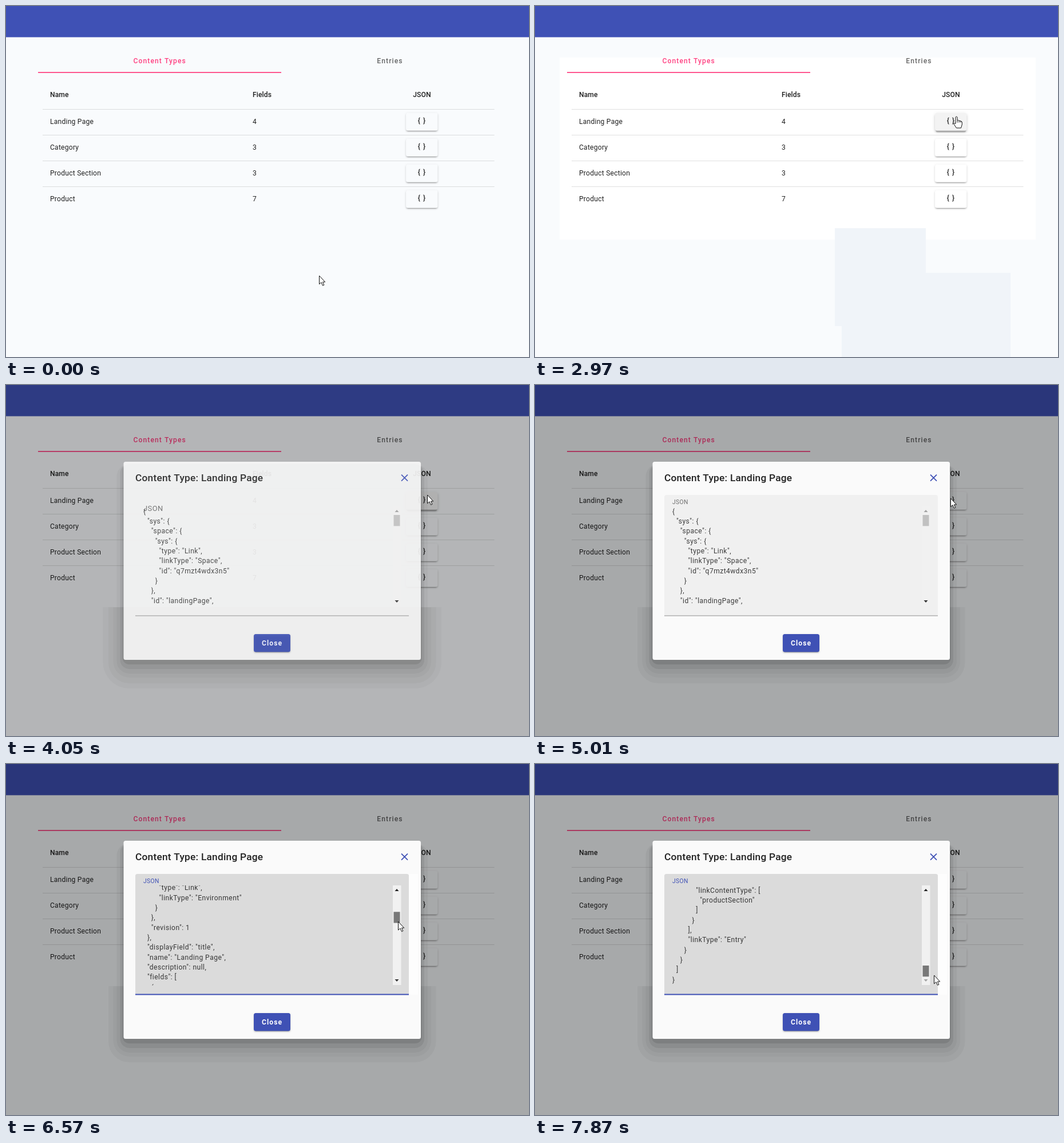
Animation, 914 px wide and 613 px high, one loop 7990 ms. Source, as an HTML page with a canvas:

```html
<!DOCTYPE html>
<html lang="en">
<head>
<meta charset="utf-8">
<title>Content types</title>
<style>
  html, body { margin: 0; width: 100%; height: 100%; overflow: hidden; background: #f9fbfd; }
  canvas { display: block; }
</style>
</head>
<body>
<canvas id="stage" width="914" height="613"></canvas>
<script>
const ctx = document.getElementById('stage').getContext('2d');
const LOOP = 7990, FONT = 12.14, LINE = 17.34;
const PAGE = '#f9fbfd', GHOST = '#f0f4f9', INDIGO = '#3f51b5', PINK = '#ff4081', INK = 'rgba(0,0,0,.87)';
const ROWS = [['Landing Page', 4], ['Category', 3], ['Product Section', 3], ['Product', 7]];

const field = (id, name, type) =>
  ({ id, name, type, localized: false, required: false, disabled: false, omitted: false });
const link = (linkType, id) => ({ type: 'Link', linkType, id });
const model = {
  sys: {
    space: { sys: link('Space', 'q7mzt4wdx3n5') },
    id: 'landingPage',
    type: 'ContentType',
    createdAt: '2020-04-02T09:14:27.310Z',
    updatedAt: '2020-04-02T09:14:27.310Z',
    environment: { sys: { id: 'master', type: 'Link', linkType: 'Environment' } },
    revision: 1
  },
  displayField: 'title',
  name: 'Landing Page',
  description: null,
  fields: [
    field('title', 'Title', 'Symbol'),
    field('slug', 'Slug', 'Symbol'),
    field('intro', 'Intro', 'Text'),
    {
      ...field('sections', 'Sections', 'Array'),
      items: {
        type: 'Link',
        validations: [{ linkContentType: ['productSection'] }],
        linkType: 'Entry'
      }
    }
  ]
};
const lines = JSON.stringify(model, null, 2).split('\n');
const MAX_SCROLL = (lines.length - 10) * LINE;

const arrow = new Path2D('M0 0V14.8L3.5 11.7 6 17.3 8.3 16.3 6 11H10.2Z');
const hand = new Path2D('M-1.5 10V1.2Q0-1.2 1.5 1.2V7Q4 5.4 4.6 7.6Q7 6.4 7.5 8.6' +
  'Q9.6 8 9.8 10V14L8 20H0L-4.6 13Q-4.4 10.4-1.5 12.5Z');

const roam = [[545, 476], [600, 520], [700, 570], [812, 612], [760, 590], [640, 550], [574, 524]];
const climb = [[556, 530], [545, 505], [600, 450], [665, 400], [700, 320], [725, 240], [736, 193]];

// Number of steps (0..n) done when the first falls on a and the last on b.
function steps(t, a, b, n) {
  return t < a ? 0 : Math.min(n, 1 + Math.floor((t - a + 1) * (n - 1) / (b - a)));
}
const mix = (a, b, k) => a + (b - a) * k;
const black = a => `rgba(0,0,0,${a})`;

function rect(x, y, w, h, color, r = 0) {
  ctx.fillStyle = color;
  ctx.beginPath();
  ctx.roundRect(x, y, w, h, r);
  ctx.fill();
}

function text(str, x, y, { size = FONT, weight = 400, gap = 0, color = INK, align = 'left' } = {}) {
  ctx.font = `${weight} ${size}px Roboto, sans-serif`;
  ctx.letterSpacing = gap + 'px';
  ctx.textAlign = align;
  ctx.fillStyle = color;
  ctx.fillText(str, x, y);
}

function shadow(x, y, w, h, dy, blur, spread, alpha) {
  ctx.save();
  ctx.shadowColor = black(alpha);
  ctx.shadowBlur = blur;
  ctx.shadowOffsetX = 2000;
  ctx.shadowOffsetY = dy;
  rect(x - 2000 - spread, y - spread, w + 2 * spread, h + 2 * spread, '#000', 3);
  ctx.restore();
}

function raised(x, y, w, h, color, lift = 1) {
  shadow(x, y, w, h, 2.4 * lift, 1, -1.5, .22);
  shadow(x, y, w, h, 1.7 * lift, 2 * lift, 0, .14);
  shadow(x, y, w, h, .9 * lift, 4 * lift, 0, .1);
  rect(x, y, w, h, color, 3.5);
}

function drawPage(t) {
  const open = t >= 3930;
  const card = open ? 0 : steps(t, 1490, 1910, 4) / 4;
  const hover = t >= 2970 && t < 4290;
  rect(0, 0, 914, 613, PAGE);
  if (!open) {
    rect(43, 90, 832, 318, `rgba(255,255,255,${card})`);
    if (t >= 890) rect(536, 466, 295, 147, GHOST);
    if (t >= 2580) rect(524, 388, 159, 171, GHOST);
  }
  rect(0, 0, 914, 54.5, INDIGO);

  const tab = { weight: 500, gap: 1.084, align: 'center' };
  text('Content Types', 268.7, 100, { ...tab, color: PINK });
  text('Entries', 671, 100, { ...tab, color: black(.6) });
  rect(56, 115.3, 425, 1.7, PINK);

  const head = { weight: 500, gap: .087 };
  text('Name', 77, 159, head);
  text('Fields', 431, 159, head);
  text('JSON', 727, 159, { ...head, align: 'center' });

  ROWS.forEach(([name, count], i) => {
    const y = 180 + Math.round(i * 45.07);
    rect(64, y, 789.5, 1, black(.12));
    text(name, 77, y + 26, { gap: .217 });
    text(count, 431, y + 26, { gap: .217 });
    const lit = hover && i === 0;
    raised(699, y + 6.8, 55.5, 31, lit ? '#f3f3f3' : card ? '#fff' : PAGE, lit ? 1.7 : 1);
    text('{ }', 727, y + 25, { weight: 500, gap: 1.084, align: 'center' });
  });
}

function drawBands(early) {
  const bands = [[26.5, 41, .035, 388], [18, 31, .03, 388], [12, 24, .04, 138],
    [6, 16, .07, 138], [2, 8, .1, 138]];
  if (early) bands.unshift([36, 50, .03, 388]);
  for (const [side, drop, alpha, top] of bands) {
    const r = 10 + side;
    rect(205.5 - side, top, 519.5 + 2 * side, 480 + drop - top, black(alpha),
      top > 300 ? [0, 0, r, r] : r);
  }
}

function triangle(x, y, dir, color) {
  ctx.fillStyle = color;
  ctx.beginPath();
  ctx.moveTo(x - 3.5, y + 2 * dir);
  ctx.lineTo(x + 3.5, y + 2 * dir);
  ctx.lineTo(x, y - 2 * dir);
  ctx.fill();
}

function drawField(t, phase, scroll, mouseX) {
  const focus = t >= 6120;
  const hover = t >= 5010 && mouseX < 704;
  const shade = (focus ? .125 : hover ? .06 : .04) * [0, 0, .5, 1][phase];
  if (hover) rect(704, 192, 16, 211, '#fdfdfd');
  rect(226, 192, 478, 211, black(shade), [3.5, 3.5, 0, 0]);
  if (focus) rect(226, 401.6, 478, 1.8, INDIGO);
  else rect(226, 402.5, 478, 1, hover ? black(.87) : black(.42));

  const k = [0, .2, .75, 1][phase];
  const size = mix(13.6, 10.4, k);
  text('JSON', 240, mix(223, 208, k), { size, gap: size * .03125, color: focus ? INDIGO : black(.55) });

  ctx.save();
  ctx.beginPath();
  ctx.rect(226, 212, 450, 174.5);
  ctx.clip();
  lines.forEach((line, i) => {
    const y = Math.round(224.5 + i * LINE - scroll);
    if (y > 200 && y < 402) text(line, 240, y, { gap: .433, color: black(.75) });
  });
  ctx.restore();

  const p = scroll / MAX_SCROLL;
  const thumbHot = t >= 5850;
  rect(676, 212, 14.5, 174, '#f1f1f1');
  rect(677.5, 227 + p * 125, 11, 19.3, focus ? '#787878' : thumbHot ? '#a8a8a8' : '#c1c1c1');
  triangle(683, 220, 1, p > 0 ? '#222' : '#a3a3a3');
  triangle(683, 378, -1, p < 1 ? '#333' : '#a3a3a3');
}

function drawDialog(t, scroll, mouseX) {
  const phase = steps(t, 3930, 4290, 4) - 1;
  if (phase < 0) return;
  rect(0, 0, 914, 613, black([.12, .28, .32, .33][phase]));
  ctx.save();
  ctx.globalAlpha = [.35, .9, 1, 1][phase];
  if (phase === 0) {
    ctx.translate(465, 307);
    ctx.scale(.88, .88);
    ctx.translate(-465, -307);
  }
  drawBands(phase < 2);
  rect(205.5, 134, 519.5, 346, '#fafafa', 3.5);
  text('Content Type: Landing Page', 226, 168, { size: 17.34, weight: 500, gap: .217 });

  ctx.strokeStyle = INDIGO;
  ctx.lineWidth = 1.8;
  ctx.beginPath();
  ctx.moveTo(691, 156.7);
  ctx.lineTo(702, 167.7);
  ctx.moveTo(702, 156.7);
  ctx.lineTo(691, 167.7);
  ctx.stroke();

  drawField(t, phase, scroll, mouseX);
  if (phase) raised(433, 435, 64, 31.2, INDIGO);
  else rect(433, 435, 64, 31.2, INDIGO, 3.5);
  text('Close', 465, 455, { weight: 700, gap: 1.084, color: '#fff', align: 'center' });
  ctx.restore();
}

// Share of the scrollbar's way travelled while dragging.
function dragged(t) {
  const n = steps(t, 6120, 7110, 8) + steps(t, 7230, 7870, 6);
  return n <= 4 ? Math.max(0, n - 1) / 12 : .25 + (n - 4) * .075;
}

function pointer(t, drag) {
  if (t >= 6120) return [drag < .25 ? 684 + drag * 4 : mix(685, 697, (drag - .25) / .75), 244 + drag * 125];
  if (t >= 5010) {
    const k = steps(t, 5010, 6000, 8) / 8;
    return [mix(732, 683, k), mix(192, 239, k)];
  }
  if (t >= 4590) return [732, 192];
  if (t >= 4050) return [736, 192];
  if (t >= 2190) return climb[steps(t, 2190, 2970, 7) - 1];
  if (t >= 430) return roam[steps(t, 430, 1350, 7) - 1];
  return [547, 471];
}

function drawPointer(t, [x, y]) {
  const shape = t >= 2970 && t < 4050 ? hand : arrow;
  ctx.save();
  ctx.translate(x + .5, y);
  ctx.lineWidth = 1;
  ctx.lineJoin = 'round';
  ctx.fillStyle = '#fff';
  ctx.strokeStyle = '#111';
  ctx.fill(shape);
  ctx.stroke(shape);
  if (shape === hand) {
    ctx.beginPath();
    for (const fx of [1.6, 4.6, 7.5]) {
      ctx.moveTo(fx, 7.5);
      ctx.lineTo(fx, 10.5);
    }
    ctx.stroke();
  }
  ctx.restore();
}

function draw(t) {
  const drag = dragged(t);
  const mouse = pointer(t, drag);
  drawPage(t);
  drawDialog(t, drag * MAX_SCROLL, mouse[0]);
  drawPointer(t, mouse);
}

const start = performance.now();
function tick() {
  draw((performance.now() - start) % LOOP);
  requestAnimationFrame(tick);
}
tick();
</script>
</body>
</html>
```
